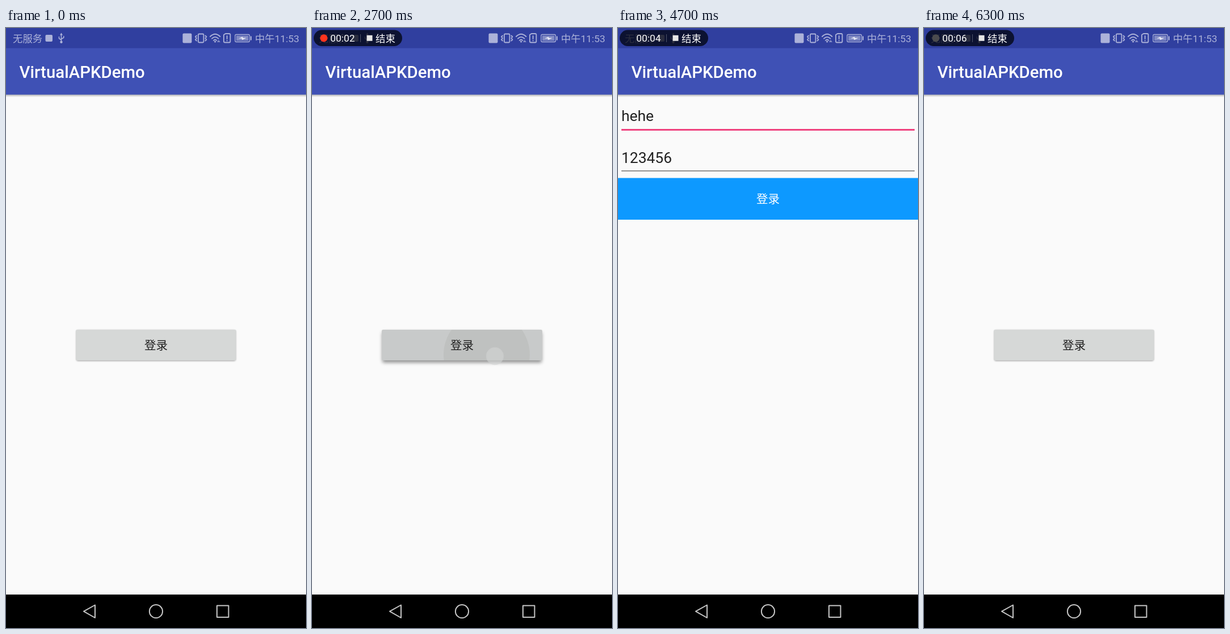
These frames come from a looping animation (529 by 1058 pixels, 6400 ms). An HTML page:

```html
<!DOCTYPE html>
<html lang="zh-CN">
<head>
<meta charset="utf-8">
<title>VirtualAPKDemo</title>
<style>
  html, body { margin: 0; width: 100%; height: 100%; overflow: hidden; background: #000; }
  svg { display: block; width: 100vw; height: 100vh; }
  text { font-family: Roboto, "Noto Sans CJK SC", "Noto Sans CJK", sans-serif; }
  .small { font-size: 17.4px; }
  .title { font-size: 29.4px; font-weight: 500; fill: #fff; }
  .field { font-size: 26.4px; fill: #212121; }
  .label { font-size: 20.6px; text-anchor: middle; }
  .line { fill: none; stroke-linejoin: round; stroke-linecap: round; }
</style>
</head>
<body>
<svg viewBox="0 0 529 1058" preserveAspectRatio="none">
  <defs>
    <linearGradient id="shade" x2="0" y2="1">
      <stop stop-color="#000" stop-opacity=".3"/>
      <stop offset="1" stop-color="#000" stop-opacity="0"/>
    </linearGradient>
    <filter id="blur" x="-10%" y="-40%" width="120%" height="180%">
      <feGaussianBlur id="blurAmount" stdDeviation="1.5"/>
    </filter>
    <clipPath id="buttonClip"><rect x="123" y="532" width="283" height="54" rx="3"/></clipPath>
    <g id="appBar">
      <rect width="529" height="999" fill="#fafafa"/>
      <rect y="117" width="529" height="5" fill="url(#shade)"/>
      <rect width="529" height="117.5" fill="#3f51b5"/>
      <rect width="529" height="35.5" fill="#303f9f"/>
      <text class="title" x="23.5" y="87.5">VirtualAPKDemo</text>
    </g>
  </defs>

  <g id="home">
    <use href="#appBar"/>
    <rect id="buttonShadow" x="124" y="533" width="281" height="54" rx="3" filter="url(#blur)"/>
    <g clip-path="url(#buttonClip)">
      <rect x="123" y="532" width="283" height="54" fill="#d6d8d7"/>
      <rect id="pressed" x="123" y="532" width="283" height="54" fill="#c8caca"/>
      <circle id="ripple" fill="#bfc1c0"/>
    </g>
    <text class="label" x="264.5" y="566.5" font-weight="500" fill="#212121">登录</text>
  </g>

  <g id="login">
    <use href="#appBar"/>
    <text class="field" x="6" y="164">hehe</text>
    <rect x="6" y="178" width="517" height="3" fill="#f0437f"/>
    <rect id="cursor" x="63" y="135.5" width="3" height="36" fill="#f0437f"/>
    <text class="field" x="6" y="238">123456</text>
    <rect x="6" y="251.3" width="517" height="1.4" fill="#666"/>
    <rect y="264.5" width="529" height="73.5" fill="#0d99ff"/>
    <text class="label" x="264.5" y="309" fill="#fff">登录</text>
  </g>

  <g id="status" fill="#acb2d9" stroke="none">
    <text class="small" x="12" y="24.5">无服务</text>
    <rect x="69.5" y="12" width="12.5" height="12" rx="2"/>
    <g class="line" stroke="#acb2d9" stroke-width="1.5">
      <path d="M97.5 12V24M93.5 15.5V18.5L97.5 21M101.8 14.5V17L97.5 19.5"/>
    </g>
    <path d="M97.5 8.5L100 12.5H95Z"/>
    <circle cx="97.5" cy="24.8" r="2.2"/>
    <rect x="311.5" y="9.5" width="16" height="17" rx="2"/>
    <g class="line" stroke="#acb2d9" stroke-width="1.8">
      <rect x="339" y="10.5" width="9.5" height="15" rx="1.5"/>
      <path d="M336 13.5L334 15.5L336 18L334 20.5L336 22.5M351.5 13.5L353.5 15.5L351.5 18L353.5 20.5L351.5 22.5"/>
      <path d="M360 15Q368.7 6.5 377.5 15M363 18.7Q368.7 13 374.5 18.7M366 22Q368.7 19 371.5 22"/>
      <path d="M384 12L387 10H393.5Q395.5 10 395.5 12V23.5Q395.5 25.5 393.5 25.5H386Q384 25.5 384 23.5ZM389.7 14V19M389.7 22V22.3"/>
      <rect x="404" y="11.5" width="25.5" height="13" rx="2" stroke-width="1.3"/>
    </g>
    <circle cx="368.7" cy="24" r="1.6"/>
    <path d="M375 21L378 25H372Z" opacity=".7"/>
    <rect x="406" y="13.5" width="21.5" height="9" opacity=".65"/>
    <rect x="431" y="14.5" width="2" height="7"/>
    <path d="M410 18.5L417 15.5L418 17.5H424L416.5 21L415.5 18.5Z" fill="#e8eaf6"/>
    <text class="small" x="517" y="24.5" text-anchor="end">中午11:53</text>
  </g>

  <g id="pill">
    <rect x="3" y="3.5" width="156" height="28.5" rx="14.25" fill="#02040f" opacity=".76"/>
    <circle id="dot" cx="20.8" cy="17.8" r="6.6"/>
    <text id="timer" class="small" x="32.3" y="24.3" fill="#fff"></text>
    <path d="M85.5 11V25" stroke="#4d5368"/>
    <rect x="96.5" y="12.8" width="10" height="10" fill="#e6e6e6"/>
    <text class="small" x="112" y="24.5" fill="#fff">结束</text>
  </g>

  <rect y="999" width="529" height="59" fill="#000"/>
  <rect id="backGlow" x="88" y="999" width="118" height="59" rx="29.5" fill="#38383b"/>
  <g class="line" stroke="#c6c6c6" stroke-width="2">
    <path d="M137 1028.7L157 1017.5V1040Z"/>
    <circle cx="264.5" cy="1028.7" r="11.6"/>
    <rect x="372" y="1018.5" width="20.5" height="20.5"/>
  </g>

  <g id="tapButton">
    <circle cx="322.5" cy="578.5" r="16.3" fill="#f6f7f8" fill-opacity=".85" stroke="#b6b9de" stroke-width="1.6"/>
  </g>
  <circle id="tapFade" cx="322.5" cy="578.5" r="15.3" fill="#d3d5d5" stroke="#cfd0d0"/>
  <circle id="tapBack" cx="162.5" cy="1039" r="15.5" fill="#a5a5aa"/>
</svg>
<script>
const LOOP = 6400, STEP = 100, WIDTH = 529;
const el = id => document.getElementById(id);
const set = (id, attrs) => {
  for (const key in attrs) el(id).setAttribute(key, attrs[key]);
};

// Linear interpolation through [time, value] keys.
function track(t, ...keys) {
  let [t0, v0] = keys[0];
  for (const [t1, v1] of keys) {
    if (t < t1) return t1 > t0 && t > t0 ? v0 + (v1 - v0) * (t - t0) / (t1 - t0) : v0;
    [t0, v0] = [t1, v1];
  }
  return v0;
}

const between = (t, from, to) => t >= from && t < to ? 1 : 0;
const easeOut = p => 1 - (1 - p) ** 3;
const mix = (a, b, p) => `rgb(${a.map((v, i) => Math.round(v + (b[i] - v) * p))})`;

function drawPill(t) {
  const seconds = [800, 1200, 3900, 4500, 5500, 6300].filter(s => t >= s).length;
  el("timer").textContent = "00:0" + seconds;
  set("pill", { opacity: track(t, [0, 0], [200, 1]) });

  const red = track(t, [0, 1], [800, 1], [1000, 0], [1900, 0], [2100, 1], [3500, 1], [3700, 0],
    [4800, 0], [5000, 1], [5900, 1], [6100, 0]);
  const hidden = between(t, 1100, 2000) || between(t, 3900, 4900);
  set("dot", { fill: mix([75, 75, 78], [255, 52, 30], red), opacity: 1 - hidden });
}

function drawButton(t) {
  const press = track(t, [2100, 0], [2500, 1], [3500, 1], [3600, 0]);
  const grow = track(t, [2100, 0], [2700, .5], [3200, 1]);
  set("pressed", { opacity: press });
  set("ripple", {
    cx: 322 - 28 * grow, cy: 578 - 4 * grow, r: 16 + 120 * grow,
    opacity: track(t, [2100, 0], [2300, 1], [2900, 1], [3300, 0])
  });
  set("buttonShadow", { opacity: .38 + .04 * press, transform: `translate(0 ${3 * press})` });
  set("blurAmount", { stdDeviation: 1.4 + 2 * press });
}

function drawPages(t) {
  const shown = t < 4400
    ? easeOut(track(t, [3100, 0], [3500, 1]))
    : 1 - easeOut(track(t, [5200, 0], [5500, 1]));
  set("home", { transform: `translate(${-WIDTH * .3 * shown})` });
  set("login", { transform: `translate(${WIDTH * (1 - shown)})`, visibility: shown ? "visible" : "hidden" });
  set("cursor", { opacity: between(t, 0, 3900) || between(t, 4300, 4700) });
}

function drawTouches(t) {
  set("tapButton", { opacity: track(t, [1100, 0], [1300, 1], [2200, 1], [2500, 0]) });
  set("tapFade", { opacity: track(t, [2200, 0], [2500, .75], [2700, .6], [2900, 0]) });
  set("backGlow", { opacity: track(t, [4900, 0], [5100, 1], [5200, 1], [5500, 0]) });
  set("tapBack", { opacity: track(t, [4800, 0], [5000, .6], [5200, .5], [5400, 0]) });
}

function frame(now) {
  const t = Math.floor(now % LOOP / STEP) * STEP;
  drawPill(t);
  drawButton(t);
  drawPages(t);
  drawTouches(t);
  requestAnimationFrame(frame);
}
frame(0);
</script>
</body>
</html>
```
